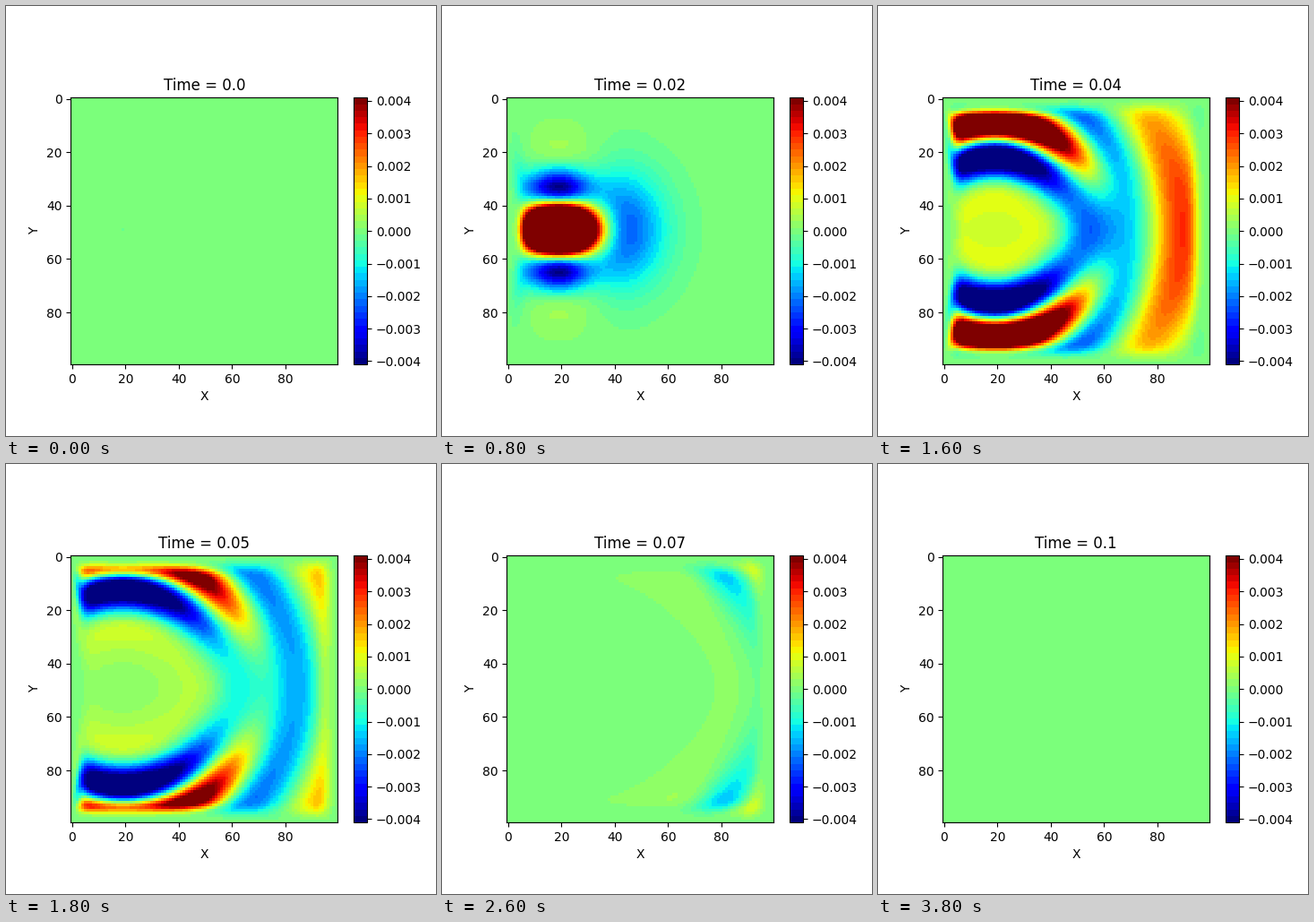
These frames come from a looping animation (480 px wide and 480 px high, 4 s). A matplotlib script:

```python
import numpy as np
import matplotlib.pyplot as plt
from matplotlib.animation import FuncAnimation

# Elastic P-SV waves from a horizontal point force, on a staggered grid
# of unit spacing with absorbing (CPML) edges. Density is scaled to one.
N = 100
VP, VS = 3300.0, 1905.0
MU = VS ** 2
LAM = VP ** 2 - 2 * MU
DT = 2e-4
FREQ = 50.0
DELAY = 1 / FREQ
FORCE = 1300.0
SRC_X, SRC_Y = 19, 49
EDGE = 10
FRAMES, STEPS = 20, 25


def ricker(t):
    a = (np.pi * FREQ * (t - DELAY)) ** 2
    return (1 - 2 * a) * np.exp(-a)


def edge_coefs(shift):
    """Memory coefficients of the absorbing layer along one axis."""
    pos = np.arange(N) + shift
    depth = np.maximum(EDGE - pos, pos - (N - 1 - EDGE)) / EDGE
    depth = np.clip(depth, 0, None)
    damp = -3 * VP * np.log(0.001) / (2 * EDGE) * depth ** 2
    alpha = np.pi * FREQ * np.clip(1 - depth, 0, None)
    b = np.exp(-(damp + alpha) * DT)
    a = damp * (b - 1) / np.maximum(damp + alpha, 1e-9)
    return a, b


COEFS = {False: edge_coefs(0.0), True: edge_coefs(0.5)}


def simulate():
    memory = {}

    def slope(name, field, axis, ahead):
        if ahead:
            d = np.diff(field, axis=axis, append=0)
        else:
            d = np.diff(field, axis=axis, prepend=0)
        a, b = COEFS[ahead]
        if axis == 0:
            a, b = a[:, None], b[:, None]
        key = name, axis
        memory[key] = b * memory.get(key, 0) + a * d
        return d + memory[key]

    vx, vy, sxx, syy, sxy = (np.zeros((N, N)) for _ in range(5))
    shots = []
    for n in range((FRAMES - 1) * STEPS + 1):
        dx = slope("vx", vx, 1, True)
        dy = slope("vy", vy, 0, False)
        sxx += DT * ((LAM + 2 * MU) * dx + LAM * dy)
        syy += DT * (LAM * dx + (LAM + 2 * MU) * dy)
        sxy += DT * MU * (slope("vy", vy, 1, False) + slope("vx", vx, 0, True))
        vx += DT * (slope("sxx", sxx, 1, False) + slope("sxy", sxy, 0, False))
        vy += DT * (slope("sxy", sxy, 1, True) + slope("syy", syy, 0, True))
        vx[SRC_Y, SRC_X] += DT * FORCE * ricker(n * DT)
        if n % STEPS == 0:
            shots.append(vx.copy())
    return shots


SIZE = 480
shots = simulate()

fig = plt.figure(figsize=(4.8, 4.8), dpi=100)


def add_axes(left, width):
    return fig.add_axes([left / SIZE, 79.9 / SIZE, width / SIZE, 297.75 / SIZE])


ax = add_axes(72.45, 297.6)
image = ax.imshow(shots[0], cmap=plt.get_cmap("jet", 41), vmin=-0.0041,
                  vmax=0.0041, interpolation="nearest", aspect="auto")
ax.set_xticks(range(0, N, 20))
ax.set_yticks(range(0, N, 20))
ax.set_xlabel("X")
ax.set_ylabel("Y")
title = ax.set_title("Time = 0.0")
fig.colorbar(image, cax=add_axes(388.4, 14.9), ticks=np.arange(-4, 5) / 1000)


def update(k):
    image.set_data(shots[k])
    title.set_text(f"Time = {(k + 1) // 2 / 100}")
    return image, title


anim = FuncAnimation(fig, update, frames=FRAMES, interval=200, repeat=True)
plt.show()
```
